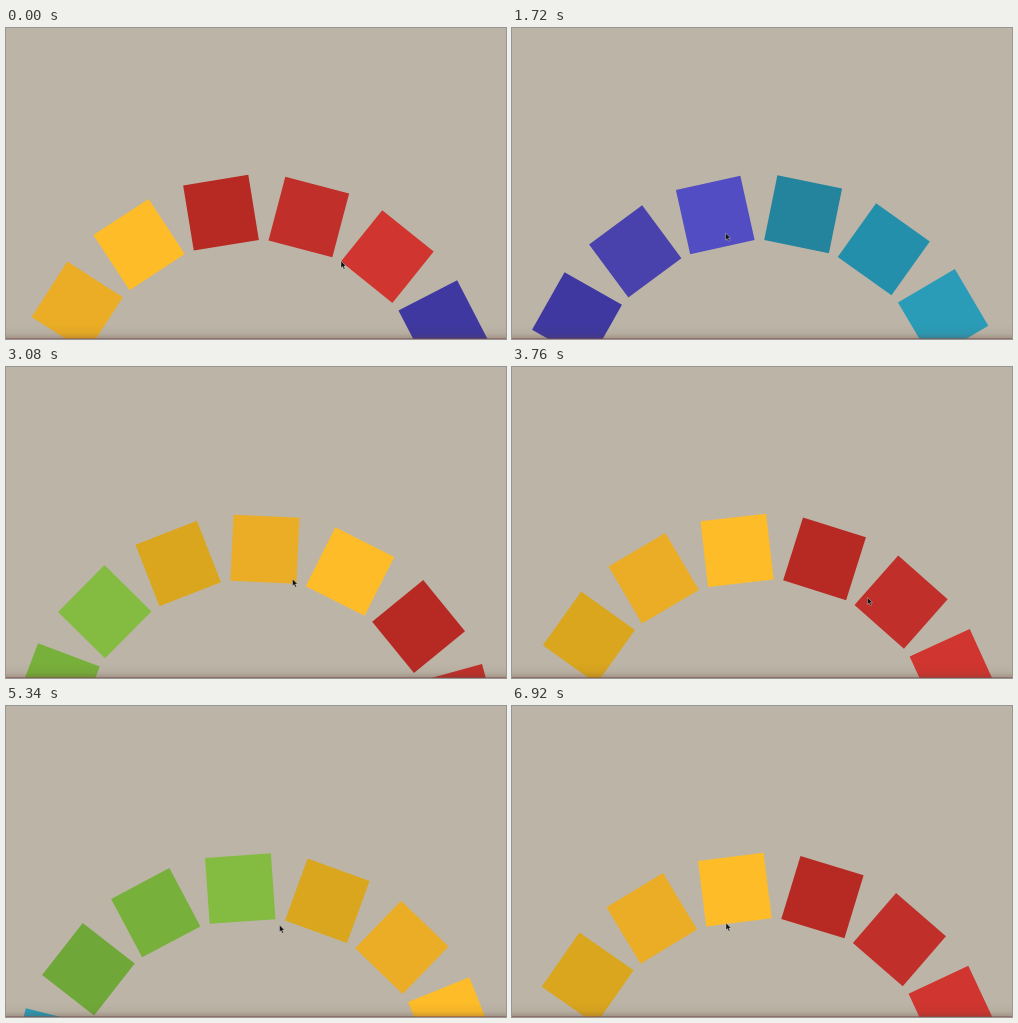
These frames come from a looping animation (500 px wide and 311 px high, 6.94 s). An HTML page:

```html
<!DOCTYPE html>
<html lang="en">
<head>
<meta charset="utf-8">
<title>Spinning colour wheel</title>
<style>
  html, body { margin: 0; width: 100%; height: 100%; overflow: hidden; background: #bcb5a7; }
  svg { display: block; width: 500px; height: 311px; }
</style>
</head>
<body>
<svg viewBox="0 0 500 311">
  <defs>
    <linearGradient id="shade" x1="0" y1="0" x2="0" y2="1">
      <stop offset="0" stop-color="#5a3c32" stop-opacity="0"/>
      <stop offset=".65" stop-color="#5a3c32" stop-opacity=".06"/>
      <stop offset="1" stop-color="#5a3c32" stop-opacity=".25"/>
    </linearGradient>
  </defs>
  <rect width="500" height="311" fill="#bcb5a7"/>
  <g id="wheel"></g>
  <rect y="296" width="500" height="14" fill="url(#shade)"/>
  <rect y="310" width="500" height="1" fill="#7d4c49" fill-opacity=".65"/>
  <path id="cursor" d="M0 0V7L1.6 5.6 2.8 8.2 4 7.6 2.9 5.1H5Z" fill="#111" stroke="#ddd" stroke-width=".4"/>
</svg>
<script>
const LOOP = 6940, STEP = 20;
const CX = 249, CY = 393.4, RADIUS = 211.4, SIDE = 66;

// Three shades of each hue, clockwise
const COLORS = [
  '#b72a23', '#c12f2a', '#d0352f',
  '#3e38a0', '#4942ac', '#534dc3',
  '#24839d', '#248fab', '#2a9cb8',
  '#6fa838', '#77b03a', '#83bc40',
  '#daa61e', '#eaad25', '#fdbc28'
];

// Two leftward flicks, each followed by a coasting wheel
const POSES = [
  { t: 440, angle: -9.25, x: 335, y: 233 },
  { t: 780, angle: -32.65, x: 331, y: 210 },
  { t: 1720, angle: -132.5, x: 213.5, y: 205 },
  { t: 3080, angle: -309.3, x: 286.5, y: 212 },
  { t: 4380, angle: -377.5, x: 396.5, y: 244 },
  { t: 5340, angle: -628, x: 273.5, y: 219 },
  { t: 6920, angle: -703.1, x: 214, y: 217 }
];

const rate = (key, i) =>
  (POSES[i + 1][key] - POSES[i][key]) / (POSES[i + 1].t - POSES[i].t);

// Harmonic mean of neighbouring rates; zero at turning points and ends
function slope(key, i) {
  if (i === 0 || i === POSES.length - 1) return 0;
  const a = rate(key, i - 1), b = rate(key, i);
  return a * b > 0 ? 2 * a * b / (a + b) : 0;
}

// Monotone cubic interpolation through the poses
function sample(key, t) {
  let i = 0;
  while (i < POSES.length - 2 && t >= POSES[i + 1].t) i++;
  const from = POSES[i], to = POSES[i + 1], span = to.t - from.t;
  const u = Math.min(1, Math.max(0, (t - from.t) / span)), v = 1 - u;
  return from[key] + (to[key] - from[key]) * u * u * (3 - 2 * u)
    + span * u * v * (slope(key, i) * v - slope(key, i + 1) * u);
}

const wheel = document.getElementById('wheel');
const cursor = document.getElementById('cursor');

COLORS.forEach((fill, i) => {
  const tile = document.createElementNS('http://www.w3.org/2000/svg', 'rect');
  const attrs = {
    x: -SIDE / 2, y: -RADIUS - SIDE / 2, width: SIDE, height: SIDE, fill,
    transform: `rotate(${i * 360 / COLORS.length})`
  };
  for (const key in attrs) tile.setAttribute(key, attrs[key]);
  wheel.append(tile);
});

function draw(t) {
  wheel.setAttribute('transform', `translate(${CX} ${CY}) rotate(${sample('angle', t)})`);
  cursor.setAttribute('transform', `translate(${sample('x', t)} ${sample('y', t)})`);
}

const start = performance.now();
function tick() {
  const t = (performance.now() - start) % LOOP;
  draw(Math.floor(t / STEP) * STEP);
  requestAnimationFrame(tick);
}
tick();
</script>
</body>
</html>
```
